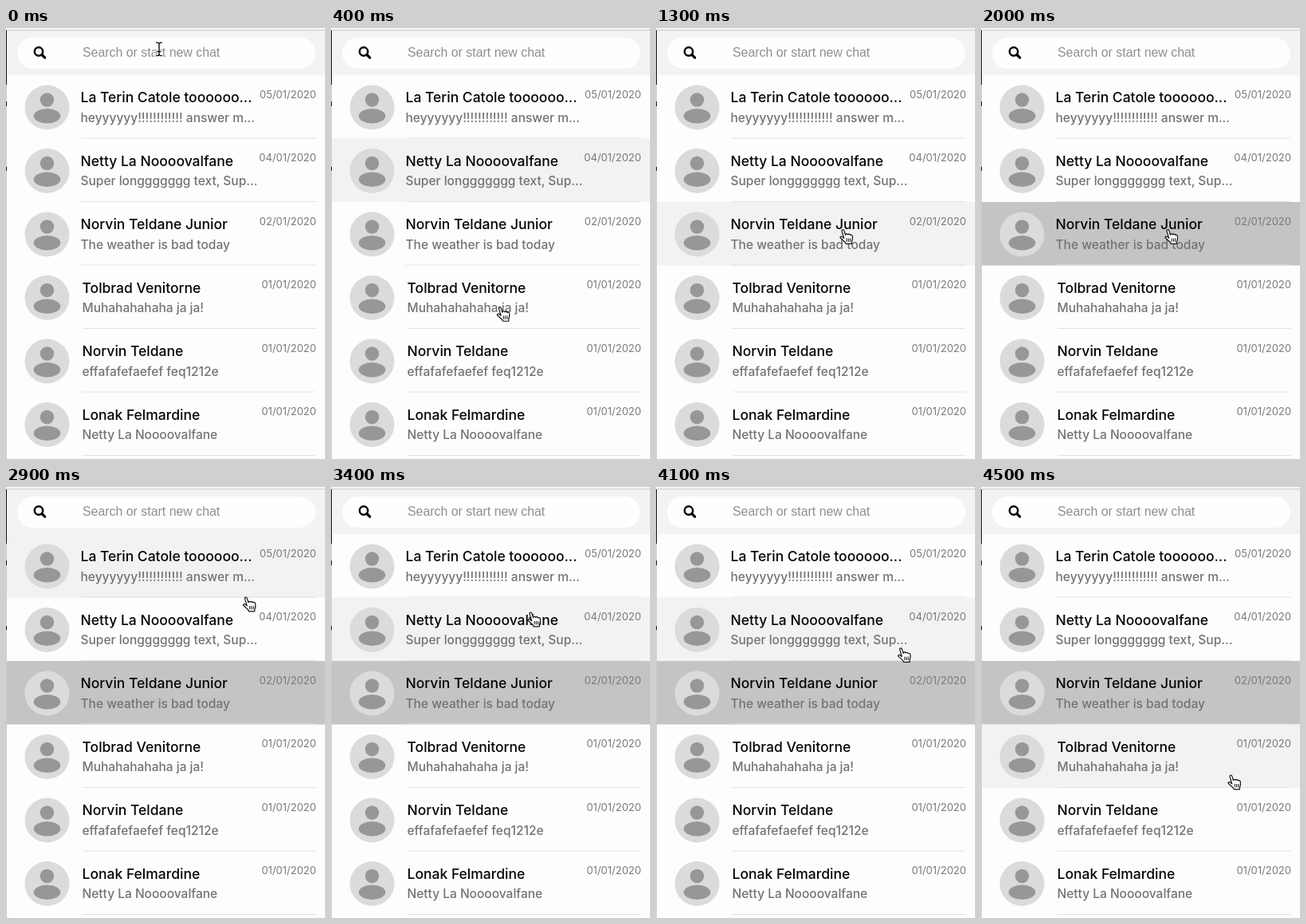
An HTML page that plays this animation: 400x540 px, repeating every 5 s.

```html
<!DOCTYPE html>
<html lang="en">
<head>
<meta charset="utf-8">
<title>Chat list</title>
<style>
  html, body { margin: 0; height: 100%; overflow: hidden; background: #fdfcfe; }
  svg { display: block; }
  text { font-family: Inter, "Noto Sans", sans-serif; white-space: pre; }
  .name { font-size: 17.5px; font-weight: 500; fill: #050505; }
  .msg { font-size: 15.5px; font-weight: 500; fill: #737274; }
  .date { font-size: 13px; fill: #7a797b; text-anchor: end; }
  .hint { font: 15.9px "Liberation Sans", Arial, sans-serif; fill: #8f8e90; }
  .line { stroke: #e2e1e3; }
  .disc { fill: #dbdadc; }
  .body { fill: #979698; }
</style>
</head>
<body>
<svg width="400" height="540" viewBox="0 0 400 540">
  <defs>
    <path id="bar" d="M-3.3-8.3Q0-8.3 0-6V6Q0 8.3-3.3 8.3M3.3-8.3Q0-8.3 0-6M3.3 8.3Q0 8.3 0 6M-2 3H2"/>
  </defs>
  <rect width="400" height="540" fill="#fdfcfe"/>
  <g id="rows"></g>

  <rect width="400" height="59" fill="#f3f2f4"/>
  <rect width="400" height="2" fill="#f7f6f8"/>
  <rect y="2" width="400" height="1.2" fill="#cfced0"/>
  <rect x="14" y="12" width="374" height="39" rx="19.5" fill="#fefdff"/>
  <g fill="none" stroke="#000" stroke-width="2.5">
    <circle cx="41" cy="29.5" r="5.2"/>
    <path d="M45 33.5l3.7 3.7" stroke-width="3.2" stroke-linecap="round"/>
  </g>
  <text class="hint" x="96" y="36">Search or start new chat</text>

  <rect y="3" width="1" height="537" fill="#cbcacc"/>
  <path d="M.5 3V71M.5 92v6M.5 174v5" stroke="#111"/>

  <g id="beam" fill="none" stroke-linecap="round">
    <use href="#bar" stroke="#fff" stroke-width="3"/>
    <use href="#bar" stroke="#111" stroke-width="1.4"/>
  </g>
  <g id="hand" stroke="#111" stroke-width="1.2" stroke-linejoin="round" stroke-linecap="round">
    <path fill="#fff" d="M6.2 12L3.6 3.4C3 1.2 5.6.6 6.3 2.6L8 8C8 6.2 10.6 6 11 7.6C11.6 6.4 13.6 6.6 13.9 8.2C15 7.4 16.6 8 16.8 9.6C17.2 12 16.8 14 16 16L15.8 19H8.6C8.4 17 5 14.6 2 12C.6 10.6 2.4 9.2 4 10.3Z"/>
    <path d="M9.7 12.6v3.6m2.2-3.6v3.6m2.2-3.6v3.6" stroke-width="1"/>
  </g>
</svg>

<script>
const TOP = 59, ROW = 79.5, STEP = 100, LOOP = 5000;
const PICKED = 2, PICK_STEP = 20;
const AWAY = 23, BACK = 27;

const chats = [
  ["La Terin Catole toooooo...", "heyyyyyy!!!!!!!!!!!! answer m...", "05/01/2020"],
  ["Netty La Noooovalfane", "Super longgggggg text, Sup...", "04/01/2020"],
  ["Norvin Teldane Junior", "The weather is bad today", "02/01/2020"],
  ["Tolbrad Venitorne", "Muhahahahaha ja ja!", "01/01/2020"],
  ["Norvin Teldane", "effafafefaefef feq1212e", "01/01/2020"],
  ["Lonak Felmardine", "Netty La Noooovalfane", "01/01/2020"]
];

// Where the pointer turns or rests: step, x, y.
const turns = [
  [1, 192, 26.5], [5, 220, 416], [8, 217.5, 147], [10, 228, 413],
  [13, 238.5, 262], [21, 238.5, 262], [22, 260, 250],
  [BACK, 312, 109], [29, 305, 147.5], [32, 311, 183], [33, 311, 183],
  [35, 198, 150], [37, 317, 127.5], [39, 309, 158], [45, 317.5, 370.5]
];

const $ = id => document.getElementById(id);
const ease = u => (1 - Math.cos(Math.PI * u)) / 2;

$("rows").innerHTML = chats.map(([name, msg, date], i) => {
  const x = i < 3 ? 93.5 : 95.5;
  return `<g transform="translate(0 ${TOP + i * ROW})">
    <rect class="bg" x="1" width="399" height="${ROW}" fill="none"/>
    <path class="line" d="M${x + .5} ${ROW - .5}H388"/>
    <circle class="disc" cx="51.5" cy="40.5" r="28"/>
    <circle class="body" cx="51.5" cy="31" r="8.7"/>
    <ellipse class="body" cx="51.5" cy="51.2" rx="16.8" ry="9.2"/>
    <text class="name" x="${x}" y="34.2">${name}</text>
    <text class="msg" x="${x}" y="58.7">${msg}</text>
    <text class="date" x="389" y="28.7">${date}</text>
  </g>`;
}).join("");

const backs = document.querySelectorAll(".bg");

function pointer(step) {
  if (step >= AWAY && step < BACK) return null;
  const next = turns.findIndex(turn => turn[0] > step);
  if (next === 0) return turns[0].slice(1);
  if (next < 0) return turns.at(-1).slice(1);
  const [s0, x0, y0] = turns[next - 1], [s1, x1, y1] = turns[next];
  const k = ease((step - s0) / (s1 - s0));
  return [x0 + (x1 - x0) * k, y0 + (y1 - y0) * k];
}

function place(el, shown, x, y) {
  el.style.display = shown ? "" : "none";
  if (shown) el.setAttribute("transform", `translate(${x} ${y})`);
}

function draw(now) {
  const step = Math.floor(now % LOOP / STEP);
  const at = pointer(step);
  // The highlight trails the pointer by one step.
  const before = pointer(step - 1);
  const hover = before ? Math.floor((before[1] - 10 - TOP) / ROW) : -1;

  backs.forEach((back, i) => {
    const picked = i === PICKED && step >= PICK_STEP;
    back.setAttribute("fill", picked ? "#c5c3c4" : i === hover ? "#f2f1f3" : "none");
  });

  const [x, y] = at || [0, 0];
  place($("beam"), at && y < TOP, x, y);
  place($("hand"), at && y >= TOP, x - 9, y - 10.7);
}

const begin = performance.now();
function tick() {
  draw(performance.now() - begin);
  requestAnimationFrame(tick);
}
tick();
</script>
</body>
</html>
```
